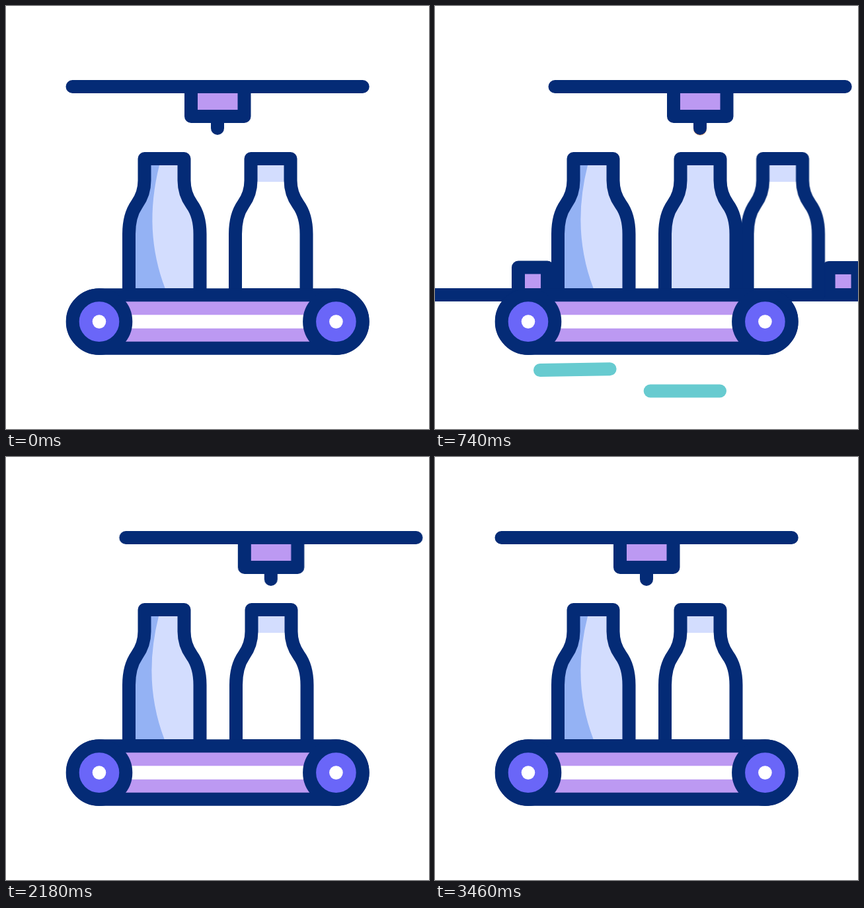
An HTML page for the animation above (3600 ms loop, 640x640 px).

```html
<!DOCTYPE html>
<html lang="en">
<head>
<meta charset="utf-8">
<title>Bottling line</title>
<style>
  @property --head { syntax: "<length>"; inherits: false; initial-value: 0px; }
  @property --tail { syntax: "<length>"; inherits: false; initial-value: 0px; }

  html, body { margin: 0; width: 100%; height: 100%; overflow: hidden; background: #fff; }
  svg { display: block; width: 100vw; height: 100vh; }

  .line { fill: none; stroke: #042b76; stroke-width: 20; stroke-linecap: round; stroke-linejoin: round; }
  .lilac { fill: #bc99f2; }
  .glass { fill: #d3ddfe; }
  .shade { fill: #94b2f4; }
  .milk { fill: #fff; }
  .wheel { fill: #6a66f8; }

  .move, .trim {
    animation-duration: 3.6s;
    animation-timing-function: cubic-bezier(.333, 0, .667, 1);
    animation-iteration-count: infinite;
  }
  .trim {
    fill: none;
    stroke-width: 20;
    stroke-linecap: round;
    stroke-dasharray: calc(var(--head) - var(--tail)) 999px;
    stroke-dashoffset: calc(-1 * var(--tail));
  }

  #dispenser { animation-name: dispenser; }
  #feeder { animation-name: feeder; }
  #taker { animation-name: taker; }
  #fresh { animation-name: fresh; }
  #next { animation-name: next; }
  #full { animation-name: full; }
  #fade { animation-name: fade; }
  #level { animation-name: level; }
  .pour { animation-name: pour-head, pour-tail, pour-show; }
  #dash1 { stroke: #67cbd0; animation-name: dash1-head, dash1-tail, dash1-show; }
  #dash2 { stroke: #67cbd0; animation-name: dash2-head, dash2-tail, dash2-show; }

  @keyframes dispenser {
    0%, 4.444% { transform: none; }
    20%, 60% { transform: translateX(81px); }
    80%, 100% { transform: none; }
  }
  @keyframes feeder {
    0%, 4.444% { transform: translateX(-308px); }
    20.278%, 21.111% { transform: none; }
    41.111%, 100% { transform: translateX(-312px); }
  }
  @keyframes taker {
    0%, 4.444% { transform: translateX(189px); }
    19.861%, 20% { transform: none; }
    39.167%, 100% { transform: translateX(200px); }
  }
  @keyframes fresh {
    0%, 4.444% { transform: translateX(-308px); }
    20.278%, 100% { transform: none; }
  }
  @keyframes next {
    0%, 4.444% { transform: none; }
    20.278%, 100% { transform: translateX(162px); }
  }
  @keyframes fade {
    0%, 4.444% { transform: none; }
    20.278%, 100% { transform: translateX(-47px); }
  }
  @keyframes full {
    0%, 4.167% { transform: translateX(161px); }
    19.861%, 20% { transform: translateX(286px); }
    39.167%, 100% { transform: translateX(486px); }
  }
  @keyframes level {
    0%, 38.889% { transform: translateY(161px); }
    49.167%, 100% { transform: none; }
  }

  @keyframes pour-head { 0%, 20% { --head: 0px; } 38.889%, 100% { --head: 279px; } }
  @keyframes pour-tail {
    0%, 48.611% { --tail: 0px; animation-timing-function: linear; }
    51.944%, 100% { --tail: 92px; }
  }
  @keyframes pour-show {
    0%, 51.944%, 100% { opacity: 0; animation-timing-function: step-end; }
    20% { opacity: 1; animation-timing-function: step-end; }
  }
  @keyframes dash1-head { 0%, 12.361% { --head: 0px; } 25.417%, 100% { --head: 153px; } }
  @keyframes dash1-tail { 0%, 21.528% { --tail: 0px; } 35.417%, 100% { --tail: 153px; } }
  @keyframes dash1-show {
    0%, 35.417%, 100% { opacity: 0; animation-timing-function: step-end; }
    12.361% { opacity: 1; animation-timing-function: step-end; }
  }
  @keyframes dash2-head { 0%, 5.278% { --head: 0px; } 18.333%, 100% { --head: 171px; } }
  @keyframes dash2-tail { 0%, 14.722% { --tail: 0px; } 28.611%, 100% { --tail: 171px; } }
  @keyframes dash2-show {
    0%, 28.611%, 100% { opacity: 0; animation-timing-function: step-end; }
    5.278% { opacity: 1; animation-timing-function: step-end; }
  }
</style>
</head>
<body>
<svg viewBox="0 0 640 640">
  <defs>
    <path id="bottle" d="M186 437V345Q186 317 198 300Q209.5 284 209.5 264V231H269.5V264Q269.5 284 281 300Q293.5 317 293.5 345V437Z"/>
    <path id="shadow" d="M150 241H232Q207 340 241 428V440H150Z"/>
    <path id="stream" d="M401 185L399.5 464"/>
    <clipPath id="inside"><use href="#bottle"/></clipPath>
  </defs>

  <path id="dash1" class="trim" d="M159 551L312 548.5"/>
  <path id="dash2" class="trim" d="M260 582.5H431"/>

  <!-- side platforms -->
  <g id="feeder" class="move">
    <rect class="lilac" x="126" y="395.5" width="44" height="41.5"/>
    <path class="line" d="M126 437V395.5H170V437M-400 437H295"/>
  </g>
  <g id="taker" class="move">
    <rect class="lilac" x="595" y="396" width="44" height="41"/>
    <path class="line" d="M595 437V396H639V437M467 437H1100"/>
  </g>

  <use href="#stream" class="trim pour" stroke="#f8ae74"/>

  <!-- bottles -->
  <g id="full" class="move">
    <use href="#bottle" class="glass"/>
    <g clip-path="url(#inside)"><rect class="milk" x="180" y="266" width="120" height="171"/></g>
    <use href="#bottle" class="line"/>
  </g>
  <g id="next" class="move">
    <use href="#bottle" class="glass"/>
    <g clip-path="url(#inside)">
      <g id="fade" class="move"><use href="#shadow" class="shade"/></g>
      <g transform="translate(-162)"><use href="#stream" class="trim pour" stroke="#fff"/></g>
      <rect id="level" class="move milk" x="180" y="266" width="120" height="175"/>
    </g>
    <use href="#bottle" class="line"/>
  </g>
  <g id="fresh" class="move">
    <use href="#bottle" class="glass"/>
    <g clip-path="url(#inside)"><use href="#shadow" class="shade" x="-1"/></g>
    <use href="#bottle" class="line"/>
  </g>

  <!-- conveyor -->
  <rect class="lilac" x="101" y="437.3" width="438.5" height="80.5" rx="40.2"/>
  <rect class="milk" x="150" y="467.3" width="340" height="20.5"/>
  <rect class="line" x="101" y="437.3" width="438.5" height="80.5" rx="40.2"/>
  <g id="wheel">
    <circle class="wheel" cx="141" cy="477.6" r="40"/>
    <circle class="line" cx="141" cy="477.6" r="40.3"/>
    <circle class="milk" cx="141" cy="477.6" r="10.3"/>
  </g>
  <use href="#wheel" x="358.4"/>

  <g id="dispenser" class="move">
    <rect class="lilac" x="280" y="122" width="80.5" height="45"/>
    <path class="line" d="M280 122V167H360.5V122M320 167V185M100.5 122H539.7"/>
  </g>
</svg>
</body>
</html>
```
